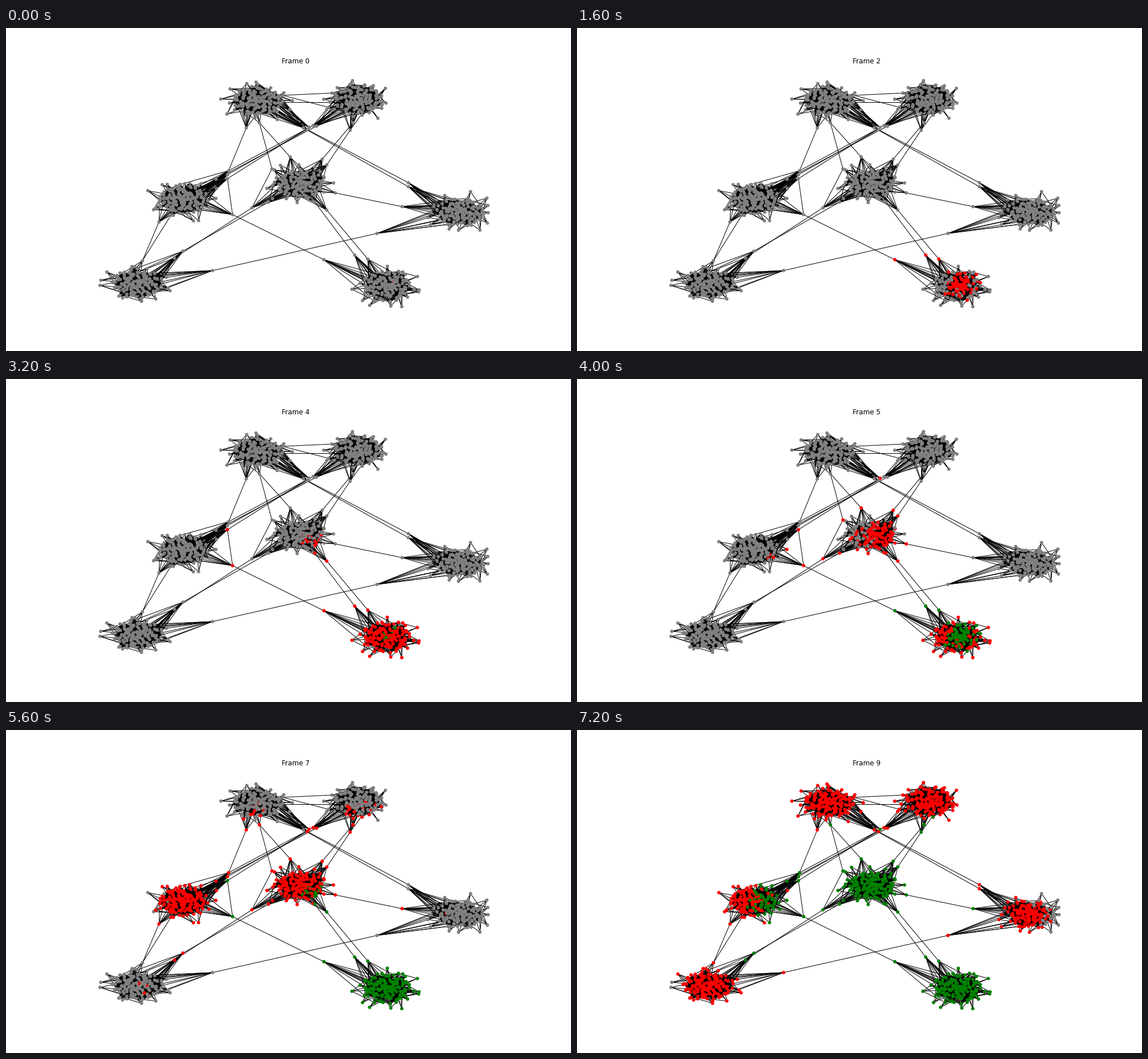
Write a matplotlib script that moves like this. It is 990 px wide and 566 px high and loops after 8000 ms.

```python
import numpy as np
import matplotlib.pyplot as plt
from matplotlib.animation import FuncAnimation
from matplotlib.collections import LineCollection

W, H, DPI = 990, 566, 72
FRAMES, INTERVAL = 10, 800
CORE, STRAY = 140, 13              # nodes per community: dense part, fringe
RADII = np.array([43, 25])         # half-axes of a community's core
GOLDEN = np.pi * (3 - np.sqrt(5))
GROWTH = 3                         # steepness of a community's outbreak
ILL_FOR = 3                        # frames from infection to recovery

# center x, y, offset of the first cases from it, frame when half are infected
COMMUNITIES = [
    (441, 128, -15, 25, 8.0),
    (618, 126, -5, 70, 7.7),
    (310, 300, 45, 10, 6.2),
    (515, 273, 25, 22, 4.85),
    (795, 323, -20, 8, 8.6),
    (230, 448, 17, 10, 8.15),
    (667, 453, 8, -8, 2.05),
]

# chains of contacts that tie the communities together
ROUTES = [
    [(557, 406), (397, 327), (388, 264), (531, 174)],
    [(611, 398), (541, 305)],
    [(634, 405), (562, 319)],
    [(577, 289), (694, 313)],
    [(362, 425), (650, 360)],
    [(289, 328), (239, 408), (268, 340)],
    [(460, 305), (310, 391)],
    [(295, 403), (431, 315), (466, 247), (444, 166), (498, 226)],
    [(421, 175), (390, 250), (538, 171)],
    [(388, 257), (528, 178), (705, 271)],
    [(368, 265), (544, 172)],
    [(521, 175), (705, 278)],
    [(603, 179), (562, 240)],
    [(608, 166), (554, 230)],
    [(571, 114), (485, 118), (565, 139)],
    [(483, 130), (568, 130)],
]

rng = np.random.default_rng(7)


def scatter_nodes(center):
    """A sunflower-packed core followed by a ring of stray nodes."""
    i = np.arange(CORE)
    core_reach = ((i + 0.5) / CORE) ** 0.65
    stray_reach = rng.uniform(1.1, 1.55, STRAY)
    turn = (np.arange(STRAY) + rng.uniform(-0.4, 0.4, STRAY)) / STRAY
    reach = np.concatenate([core_reach, stray_reach])
    angle = np.concatenate([i * GOLDEN, turn * 2 * np.pi])
    unit = np.column_stack([np.cos(angle), np.sin(angle)])
    spots = center + unit * reach[:, None] * RADII
    return spots + rng.normal(0, 2.4, spots.shape)


def outbreak(spots, focus, midpoint):
    """Logistic growth, reaching nodes roughly by distance from the focus."""
    score = np.hypot(*(spots - focus).T) + rng.normal(0, 11, len(spots))
    share = 0.94 * (score.argsort().argsort() + 0.5) / len(spots)
    return np.ceil(midpoint + np.log(share / (1 - share)) / GROWTH).astype(int)


def contacts(node, core, count):
    """Random core nodes on the side that faces the given node."""
    near = np.hypot(*(core - node).T).argsort()[:CORE // 2]
    return rng.choice(near, count, replace=False)


centers = np.array([c[:2] for c in COMMUNITIES], float)
segments, groups, group_times = [], [], []

for x, y, dx, dy, midpoint in COMMUNITIES:
    center = np.array([x, y], float)
    focus = center + (dx, dy)
    spots = scatter_nodes(center)
    core = spots[:CORE]
    for node in core:
        segments += [(node, core[j]) for j in rng.choice(CORE, 5)]
    for node in spots[CORE:]:
        segments += [(node, core[j]) for j in contacts(node, core, 4)]
    groups.append(spots)
    group_times.append(outbreak(spots, focus, midpoint))

# the outbreak starts from one person in the last community
patient = np.hypot(*(groups[-1] - focus).T).argmin()
group_times[-1][patient] = 0

bridge_times = {}
for spot in dict.fromkeys(p for route in ROUTES for p in route):
    node = np.array(spot, float)
    reach = np.hypot(*((centers - node) / RADII).T)
    home = reach.argmin()
    core = groups[home][:CORE]
    known = contacts(node, core, 10 if reach[home] > 1.7 else 5)
    segments += [(node, core[j]) for j in known]
    met = np.sort(group_times[home][known])
    bridge_times[spot] = met[len(met) // 3]

links = [pair for route in ROUTES for pair in zip(route, route[1:])]
segments += links
for _ in range(FRAMES):
    for a, b in links:
        bridge_times[a] = min(bridge_times[a], bridge_times[b] + 1)
        bridge_times[b] = min(bridge_times[b], bridge_times[a] + 1)

points = np.vstack(groups + [np.array(list(bridge_times), float)])
times = np.concatenate(group_times + [list(bridge_times.values())])
PALETTE = np.array(["gray", "red", "green"])

fig, ax = plt.subplots(figsize=(W / DPI, H / DPI), dpi=DPI, facecolor="white")
# data units are stage pixels, y pointing down
ax.set_xlim(0.125 * W, 0.9 * W)
ax.set_ylim(0.89 * H, 0.12 * H)
ax.axis("off")
ax.add_collection(LineCollection(segments, colors="black", linewidths=1,
                                 zorder=1), autolim=False)
nodes = ax.scatter(*points.T, s=20, linewidths=1.5, zorder=2)
title = ax.set_title("Frame 0", fontsize=12, fontfamily="DejaVu Sans")


def draw(frame):
    state = (times <= frame).astype(int) + (times + ILL_FOR <= frame)
    nodes.set_color(PALETTE[state])
    title.set_text(f"Frame {frame}")
    return nodes, title


anim = FuncAnimation(fig, draw, frames=FRAMES, interval=INTERVAL,
                     repeat=True, repeat_delay=0)
plt.show()
```
